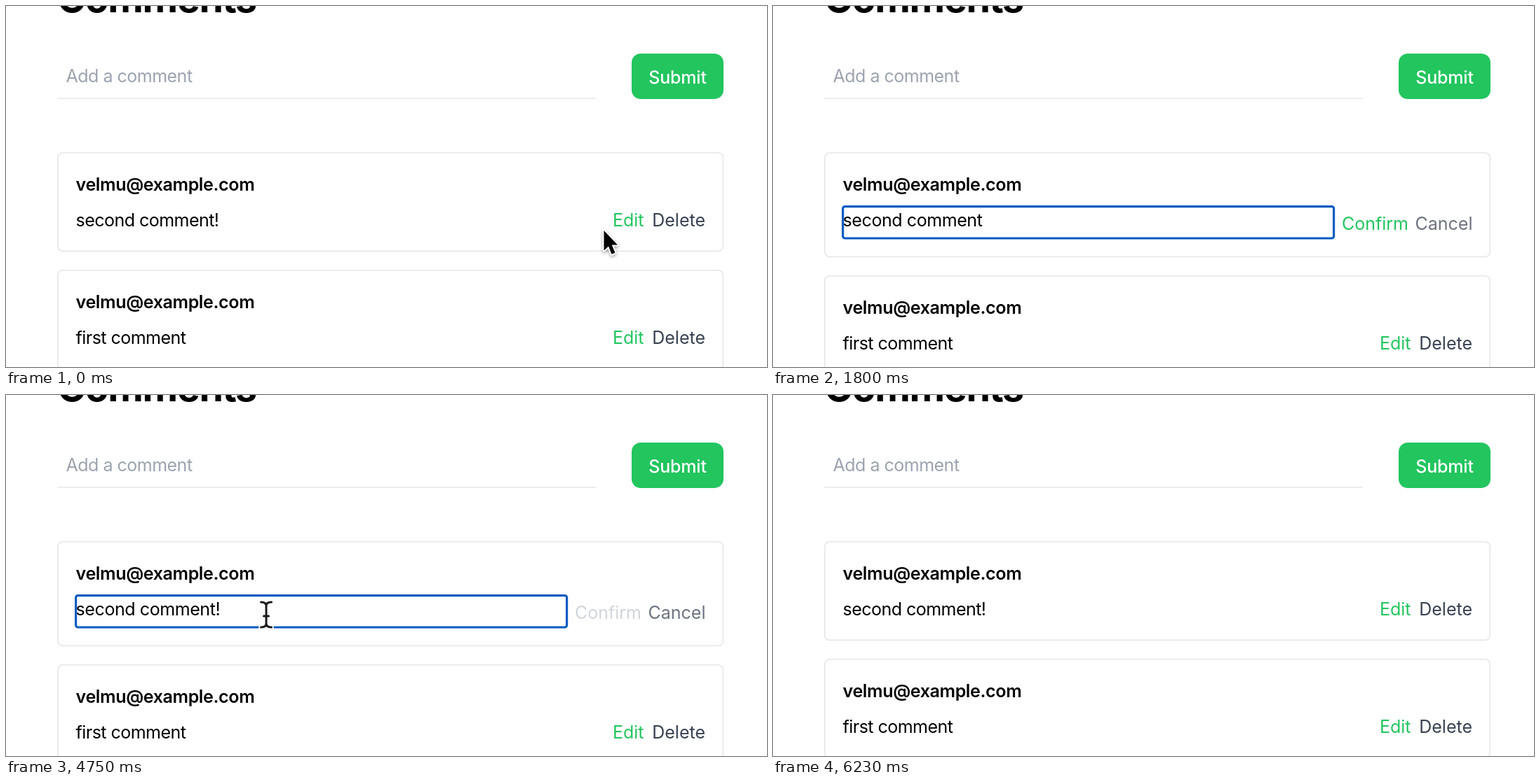
Recreate the animation shown at these times as an HTML page. Size 1085 by 516 pixels, loop 6.31 s.

```html
<!DOCTYPE html>
<html lang="en">
<head>
<meta charset="utf-8">
<title>Comments</title>
<style>
  html, body { margin: 0; width: 100%; height: 100%; overflow: hidden; background: #fff; }
  svg { display: block; width: 1085px; height: 516px; }
  text { font: 400 25px Inter, "Liberation Sans", sans-serif; font-optical-sizing: none; white-space: pre; }
  .title { font-size: 55.5px; font-weight: 700; letter-spacing: -1.4px; }
  .mail { font-weight: 600; letter-spacing: -.36px; }
  .body { letter-spacing: -.54px; }
  .input { letter-spacing: -.42px; }
  .hint { fill: #9ca3af; letter-spacing: -.5px; }
  .submit { fill: #fff; font-weight: 450; letter-spacing: -.2px; text-anchor: middle; }
  .end { text-anchor: end; }
  .green { fill: #22c55e; }
  .dark { fill: #374151; }
  .gray { fill: #6b7280; }
  .line { fill: none; stroke: #e5e7eb; stroke-width: 1.6; }
  .ring { fill: none; stroke: #075bc2; stroke-width: 3.2; }
  .beam { fill: none; stroke-linecap: round; }
  #arrow { filter: drop-shadow(0 2px 2px rgba(0, 0, 0, .35)); }
</style>
</head>
<body>
<svg viewBox="0 0 1085 516">
  <defs>
    <path id="beamShape" d="M-7.5-18Q0-18 0-12.500V12.500Q0 18-7.500 18M7.500-18Q0-18 0-12.500M0 12.500Q0 18 7.500 18M-3.500 2H3.500"/>
  </defs>

  <text class="title" x="73" y="8.500">Comments</text>
  <text class="hint" x="85.500" y="109">Add a comment</text>
  <path class="line" d="M73 132H841"/>
  <rect class="green" x="892" y="68" width="131" height="65" rx="13"/>
  <text class="submit" x="957.500" y="111">Submit</text>

  <rect id="card" class="line" x="73.800" y="209.800" width="948.500" height="140.600" rx="7"/>
  <text class="mail" x="99.600" y="264">velmu@example.com</text>

  <g id="view">
    <text class="body" x="99.600" y="315">second comment!</text>
    <text class="green end" x="909.500" y="315">Edit</text>
    <text class="dark end" x="997" y="315">Delete</text>
  </g>

  <g id="edit">
    <path id="rule" class="line" d="M100 331.500H800"/>
    <rect id="ring" class="ring" x="99.600" y="286.600" width="700" height="45.400" rx="3"/>
    <text id="draft" class="input" x="99.600" y="315"></text>
    <rect id="caret" y="291" width="1.700" height="29"/>
    <text id="confirm" class="end" x="906" y="320">Confirm</text>
    <text class="gray end" x="997.500" y="320">Cancel</text>
  </g>

  <g id="next">
    <rect class="line" x="73.800" y="377.800" width="948.500" height="140.600" rx="7"/>
    <text class="mail" x="99.600" y="432">velmu@example.com</text>
    <text class="body" x="99.600" y="483">first comment</text>
    <text class="green end" x="909.500" y="483">Edit</text>
    <text class="dark end" x="997" y="483">Delete</text>
  </g>

  <g id="arrow">
    <path d="M1.500 2V30.500L8 24.500L12.500 35.800L17.500 33.700L12.700 22.500H21Z"
      stroke="#fff" stroke-width="4" stroke-linejoin="round" paint-order="stroke"/>
  </g>
  <g id="beam" class="beam">
    <use href="#beamShape" stroke="#fff" stroke-width="6.500"/>
    <use href="#beamShape" stroke="#1a1a1a" stroke-width="3"/>
  </g>
</svg>
<script>
  const LOOP = 6310, STEP = 50;
  const FULL = "second comment!", STEM = "second ".length;
  const el = Object.fromEntries([...document.querySelectorAll("[id]")].map(e => [e.id, e]));

  // Pointer path: time, x, y
  const path = [
    [0, 851, 319], [100, 863, 325], [200, 881, 324], [250, 877, 319],
    [800, 877, 319], [900, 850, 321], [1050, 660, 319], [1200, 470, 316], [1400, 351, 314],
    [1700, 351, 314], [4750, 371, 314], [4800, 371, 314], [4900, 430, 302], [5000, 580, 268],
    [5100, 690, 248], [5200, 755, 249], [5250, 784, 255], [5300, 880, 284],
    [5350, 948, 312], [5450, 970, 317], [LOOP, 970, 317]
  ];

  const within = (t, a, b) => t >= a && t < b;
  const show = (node, on) => node.setAttribute("display", on ? "inline" : "none");

  function pointer(t) {
    const i = path.findIndex(p => p[0] > t);
    const a = path[i - 1], b = path[i], k = (t - a[0]) / (b[0] - a[0]);
    return [a[1] + (b[1] - a[1]) * k, a[2] + (b[2] - a[2]) * k];
  }

  function draftLength(t) {
    if (t < 1750 || t >= 4300) return FULL.length;
    if (t < 2200) return FULL.length - 1;
    if (t < 3550) return Math.max(STEM, 13 - Math.floor((t - 2200) / 100));
    return Math.min(FULL.length - 1, STEM + 1 + Math.floor((t - 3550) / 75));
  }

  function render(time) {
    const t = Math.floor(time / STEP) * STEP;
    const editing = within(t, 400, 5800);
    const focused = within(t, 1400, 5150);
    show(el.view, !editing);
    show(el.edit, editing);
    show(el.ring, focused);
    show(el.rule, !focused);
    el.card.setAttribute("height", editing ? 148.6 : 140.6);
    el.next.setAttribute("transform", `translate(0 ${editing ? 8 : 0})`);

    const text = FULL.slice(0, draftLength(t));
    if (el.draft.textContent !== text) el.draft.textContent = text;
    el.confirm.setAttribute("fill", text === FULL ? "#d1d5db" : "#22c55e");

    const caret = within(t, 2050, 2200) || within(t, 2900, 3300) || within(t, 4200, 4300);
    show(el.caret, caret);
    if (caret) el.caret.setAttribute("x", 99.6 + el.draft.getComputedTextLength());

    const [x, y] = pointer(t);
    const visible = time < 6230 && !within(t, 1750, 4750);
    const overInput = editing && x < 800 && y > 285;
    show(el.arrow, visible && !overInput);
    show(el.beam, visible && overInput);
    for (const c of [el.arrow, el.beam]) c.setAttribute("transform", `translate(${x} ${y})`);
  }

  const start = performance.now();
  function tick() {
    render((performance.now() - start) % LOOP);
    requestAnimationFrame(tick);
  }
  tick();
</script>
</body>
</html>
```
